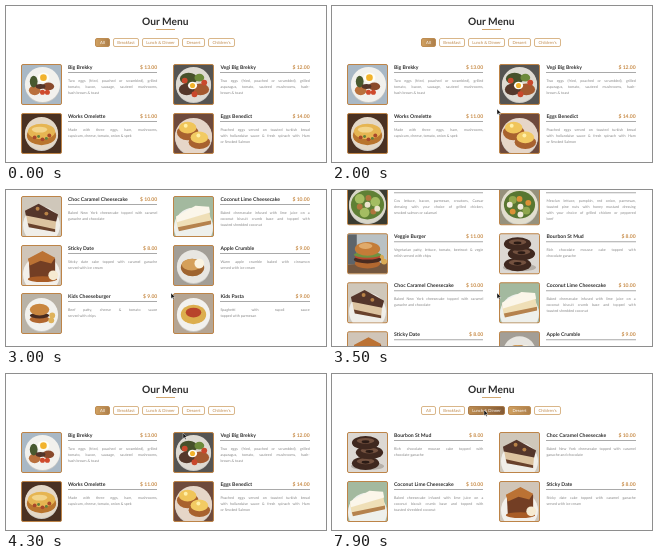
Recreate the animation shown at these times as an HTML page. Size 320 by 156 pixels, loop 8000 ms.

```html
<!DOCTYPE html>
<html lang="en">
<head>
<meta charset="utf-8">
<title>Our Menu</title>
<style>
html, body { margin: 0; width: 100%; height: 100%; overflow: hidden; background: #fff; }
body { position: relative; font-family: Lato, "Open Sans", sans-serif; color: #2e2e2e; text-rendering: geometricPrecision; }
#page { position: absolute; left: 0; top: 0; width: 320px; }
#page > * { position: absolute; }
h1 { left: 0; width: 318.5px; top: 9.6px; margin: 0; font-size: 10.2px; line-height: 12px; font-weight: 700; text-align: center; }
#rule { left: 150px; top: 23px; width: 19px; height: 1px; background: #d3a871; }
.tab { top: 32px; height: 9px; box-sizing: border-box; border: 1px solid #d9b689; border-radius: 2px; font-size: 4.2px; line-height: 7px; text-align: center; white-space: nowrap; color: #c08a4c; }
.tab.active { background: linear-gradient(90deg, #d0a060, #ad7f4b); border-color: #bd8c51; color: #fff; }
.tab.hover { background: linear-gradient(90deg, #bd8d52, #845b36); border-color: #a97a48; color: #fff; }
#menu { left: 15px; top: 58px; display: grid; grid-template-columns: 152.4px 152.4px; grid-auto-rows: 48.8px; }
.item { position: relative; }
.item svg { position: absolute; left: 0; top: 0; width: 39px; height: 39px; border: 1px solid #bd8448; border-radius: 2px; }
.text { position: absolute; left: 47px; top: 0; width: 89.3px; }
.head { display: flex; justify-content: space-between; height: 8px; border-bottom: 1px solid #a9a9a9; font-size: 5.1px; line-height: 8.4px; font-weight: 700; white-space: nowrap; }
.head b { color: #c78b47; }
.desc { margin-top: 5px; font-size: 3.65px; line-height: 6px; color: #858585; }
.desc div { white-space: nowrap; text-align-last: justify; }
.desc div:last-child { text-align-last: left; }
#cursor { position: absolute; left: 0; top: 0; width: 5px; height: 7px; overflow: visible; }
</style>
</head>
<body>
<div id="page">
  <h1>Our Menu</h1>
  <div id="rule"></div>
  <div id="menu"></div>
</div>
<svg id="cursor" viewBox="0 0 5 7"><path d="M0 0V5.6L1.4 4.4 2.3 6.4 3.2 6 2.3 4.1H4.1Z" fill="#111" stroke="#fff" stroke-width=".4"/></svg>
<script>
const page = document.getElementById('page');
const menu = document.getElementById('menu');
const cursor = document.getElementById('cursor');

// Shapes on a 40 by 40 photo
const oval = (fill, x, y, rx, ry = rx) => `<ellipse cx="${x}" cy="${y}" rx="${rx}" ry="${ry}" fill="${fill}"/>`;
const poly = (fill, points) => `<polygon points="${points}" fill="${fill}"/>`;
const dots = (fill, r, ...at) => at.map(([x, y]) => oval(fill, x, y, r)).join('');
const egg = (x, y, r) => oval('#fffdf4', x, y, r * 1.8, r * 1.5) + oval('#f2b32c', x, y, r);
const plate = (fill = '#f2f1ed', x = 20, y = 21, r = 17) => oval('#c9c8c4', x, y + 1, r) + oval(fill, x, y, r);

const items = [
  ['Big Brekky', 13, 'Two eggs (fried, poached or scrambled), grilled|tomato, bacon, sausage, sauteed mushrooms,|hash brown & toast',
    '#a9b8c5', plate('#f2f1ed', 21, 20, 18) + oval('#b9703c', 13, 26, 6, 5) + oval('#48592f', 12, 17, 4, 6) + egg(22, 13, 3.4) + oval('#8a4a2c', 27, 22, 6, 4) + dots('#cf4a2c', 2.6, [21, 28], [26, 28]) + oval('#53352a', 19, 22, 5, 2.5)],
  ['Vegi Big Brekky', 12, 'Two eggs (fried, poached or scrambled), grilled|asparagus, tomato, sauteed mushrooms, hash-|brown & toast',
    '#555452', plate('#dedad2', 20, 20, 18) + oval('#47512b', 15, 14, 9, 6) + oval('#6d8a3a', 26, 13, 5, 4) + oval('#a4592f', 27, 25, 9, 6) + oval('#54382b', 13, 25, 8, 6) + egg(19, 21, 2.6) + dots('#c9482c', 3, [11, 16], [31, 18], [21, 30])],
  ['Works Omelette', 11, 'Made with three eggs, ham, mushrooms,|capsicum, cheese, tomato, onion & spek',
    '#4a3122', plate('#e4d8c7', 20, 20, 17) + oval('#b9752e', 20, 22, 15, 10) + oval('#e6b552', 20, 18, 14, 8) + oval('#f3d58b', 18, 16, 8, 3) + dots('#a9482b', 2, [13, 24], [21, 26], [28, 22]) + dots('#64813a', 1.5, [17, 23], [25, 25])],
  ['Eggs Benedict', 14, 'Poached eggs served on toasted turkish bread|with hollandaise sauce & fresh spinach with Ham|or Smoked Salmon',
    '#6e4a3c', plate('#e6d6c8', 20, 23, 19) + oval('#a8622f', 14, 19, 11, 8) + oval('#f0c55a', 14, 14, 9, 6) + oval('#a8622f', 26, 29, 11, 7) + oval('#f2cb63', 26, 24, 9, 6) + dots('#fff0a8', 2, [12, 12], [25, 22])],
  ['Buttermilk Pancakes', 12, 'Three fluffy pancakes served with fresh berries,|maple syrup & ice cream',
    '#c3b3a0', plate() + oval('#b87333', 20, 25, 11, 6) + oval('#dda757', 20, 21, 11, 6) + dots('#b83240', 2, [17, 19], [22, 20])],
  ['Smashed Avocado', 13, 'Smashed avocado with feta, cherry tomato &|poached eggs on toasted sourdough',
    '#88857e', plate() + oval('#a66c3c', 20, 23, 13, 8) + oval('#88a64b', 20, 20, 11, 7) + egg(20, 18, 3)],
  ['Chicken Fettuccine Carbonara', 18, 'Fresh fettuccine with chicken, bacon & garlic|finished with a white wine & cream sauce',
    '#c9bfae', plate('#eee8dc', 20, 21, 19) + oval('#c9a258', 20, 20, 15, 12) + oval('#ead08f', 18, 17, 11, 7) + dots('#a8683f', 2, [13, 23], [26, 18], [25, 26]) + dots('#66823f', 1.2, [19, 13], [20, 24])],
  ['Vegetarian Fettuccine', 17, 'Sauteed mushrooms, roasted capsicum, Spanish|onion, baby spinach semi sundried tomato tossed|with roast tomato napoli',
    '#a79c8d', plate('#e8e2d8', 20, 23, 19) + oval('#a85f33', 20, 22, 15, 12) + oval('#dba65a', 21, 19, 10, 7) + dots('#b8432b', 2.4, [11, 21], [23, 27], [28, 17]) + dots('#557b35', 2, [18, 13], [16, 27], [30, 23])],
  ['Caesar Salad', 10, 'Cos lettuce, bacon, parmesan, croutons, Caesar|dressing with your choice of grilled chicken,|smoked salmon or calamari',
    '#3a3b30', plate('#d9d7c9', 20, 20, 19) + oval('#5f8035', 20, 20, 17, 15) + dots('#a4bd62', 5, [12, 14], [28, 17], [17, 28]) + dots('#b0753d', 3, [21, 13], [12, 22], [26, 27]) + dots('#ece4cc', 3, [20, 20], [30, 24])],
  ['Pumpkin & Parmesan Salad', 10, 'Mesclun lettuce, pumpkin, red onion, parmesan,|toasted pine nuts with honey mustard dressing|with your choice of grilled chicken or peppered|beef',
    '#96917c', plate('#e2dece', 20, 21, 19) + oval('#587631', 20, 20, 16, 14) + dots('#8fa64d', 4, [13, 15], [27, 26]) + dots('#dc9136', 3, [20, 14], [29, 18], [13, 27]) + dots('#f1ead8', 3, [21, 22], [21, 30], [10, 20])],
  ['Veggie Burger', 11, 'Vegetarian patty, lettuce, tomato, beetroot & vegie|relish served with chips',
    '#b9c1c4', poly('#5d646a', '0,0 9,0 9,31 0,31') + poly('#74573f', '0,31 40,29 40,40 0,40') + dots('#d9aa55', 3, [34, 24], [37, 28]) + oval('#b26830', 20, 30, 13, 5) + oval('#482b20', 20, 26, 14, 4) + oval('#b8482f', 20, 23, 13, 3) + oval('#6f9340', 20, 21, 14, 3) + oval('#c47c38', 20, 15, 13, 7) + oval('#e0aa6a', 18, 12, 7, 3)],
  ['Bourbon St Mud', 8, 'Rich chocolate mousse cake topped with|chocolate ganache',
    '#dcd8d3', oval('#b5afa8', 20, 34, 17, 4) + [[18, 31], [22, 20], [18, 10]].map(([x, y]) => oval('#3f281f', x, y, 14, 7) + oval('#73513f', x, y - 2, 9, 3) + oval('#2b1b15', x, y - 1, 4, 1.5)).join(''), 1],
  ['Choc Caramel Cheesecake', 10, 'Baked New York cheesecake topped with caramel|ganache and chocolate',
    '#cfc7ba', plate('#f0eee9', 20, 29, 19) + poly('#dcc3a0', '4,17 35,24 34,34 6,28') + poly('#54352a', '3,14 17,7 37,18 35,25 4,19') + poly('#69412b', '6,27 34,33 34,36 7,31') + dots('#b88247', 2, [16, 12], [25, 17]), 1],
  ['Coconut Lime Cheesecake', 10, 'Baked cheesecake infused with lime juice on a|coconut biscuit crumb base and topped with|toasted shredded coconut',
    '#a3b99f', plate('#eef0ec', 20, 31, 20) + poly('#efdfb7', '2,22 36,13 38,26 4,33') + poly('#fbf6ea', '2,20 22,9 36,10 37,16 3,26') + poly('#b5824d', '4,31 38,24 38,28 5,35'), 1],
  ['Sticky Date', 8, 'Sticky date cake topped with caramel ganache|served with ice cream',
    '#d0c5b8', plate('#f3f0eb', 20, 29, 19) + poly('#733e24', '7,14 21,6 34,13 34,32 8,33') + poly('#bb7234', '6,13 21,5 34,12 30,18 19,15 8,20') + oval('#a95c26', 21, 34, 15, 3) + oval('#f6ead1', 32, 30, 5), 1],
  ['Apple Crumble', 9, 'Warm apple crumble baked with cinnamon|served with ice cream',
    '#a39e96', plate('#e8e6e1') + oval('#9f642f', 19, 22, 12, 9) + oval('#d5a05a', 18, 19, 10, 6) + oval('#fbf3df', 26, 18, 5), 1],
  ['Kids Cheeseburger', 9, 'Beef patty, cheese & tomato sauce|served with chips',
    '#b9b2a6', plate() + oval('#b26830', 18, 26, 10, 4) + oval('#482b20', 18, 22, 10, 3) + oval('#c9863f', 18, 16, 10, 6) + dots('#dfb35c', 3, [31, 22], [30, 27])],
  ['Kids Pasta', 9, 'Spaghetti with napoli sauce|topped with parmesan',
    '#b5a593', plate() + oval('#dcae4d', 20, 21, 13, 10) + oval('#b8432b', 20, 19, 8, 5)],
];

const escape = s => s.replace(/&/g, '&amp;');
const cards = items.map(([name, price, desc, back, shapes, dessert]) => {
  const card = document.createElement('div');
  card.className = 'item';
  card.dessert = dessert;
  card.innerHTML = `<svg viewBox="0 0 40 40" style="background:${back}">${shapes}</svg>
    <div class="text"><div class="head"><span>${escape(name)}</span><b>$ ${price.toFixed(2)}</b></div>
    <div class="desc">${desc.split('|').map(line => `<div>${escape(line)}</div>`).join('')}</div></div>`;
  menu.append(card);
  return card;
});

const tabs = [['All', 89, 15], ['Breakfast', 107, 26], ['Lunch & Dinner', 136, 37], ['Dessert', 176, 23], ["Children's", 202, 27]]
  .map(([label, x, width]) => {
    const tab = document.createElement('div');
    tab.textContent = label;
    tab.style.cssText = `left:${x}px;width:${width}px`;
    page.append(tab);
    return { tab, x, width };
  });

// Keys are [time, value, ...]
function along(keys, t) {
  const i = keys.findIndex(k => k[0] > t);
  if (i < 0) return keys[keys.length - 1].slice(1);
  if (!i) return keys[0].slice(1);
  const a = keys[i - 1], b = keys[i], p = (t - a[0]) / (b[0] - a[0]);
  return a.slice(1).map((v, k) => v + (b[k + 1] - v) * p);
}
// Down to the end of the list, a short rest, then back up at a steady pace
const scrollKeys = [[2200, 0], [2500, 198], [2800, 345], [3300, 345], [4100, 0]];
const cursorKeys = [[500, 240, 157], [1300, 165, 103], [4100, 165, 103], [4300, 177, 59], [4500, 187, 37], [6800, 187, 37], [7300, 152, 36]];

function draw() {
  const t = Math.floor(performance.now() % 8000 / 100) * 100;
  const [scroll] = along(scrollKeys, t);
  const [x, y] = along(cursorKeys, t);
  const dessert = t >= 6000;
  page.style.transform = `translateY(${-scroll}px)`;
  cursor.style.transform = `translate(${x}px, ${y}px)`;
  cards.forEach(card => card.style.display = dessert && !card.dessert ? 'none' : '');
  tabs.forEach(({ tab, x: left, width }, i) => {
    const over = x >= left && x < left + width && y + scroll >= 32 && y + scroll < 41;
    tab.className = 'tab' + (i === (dessert ? 3 : 0) ? ' active' : '') + (over ? ' hover' : '');
  });
  requestAnimationFrame(draw);
}
draw();
</script>
</body>
</html>
```
